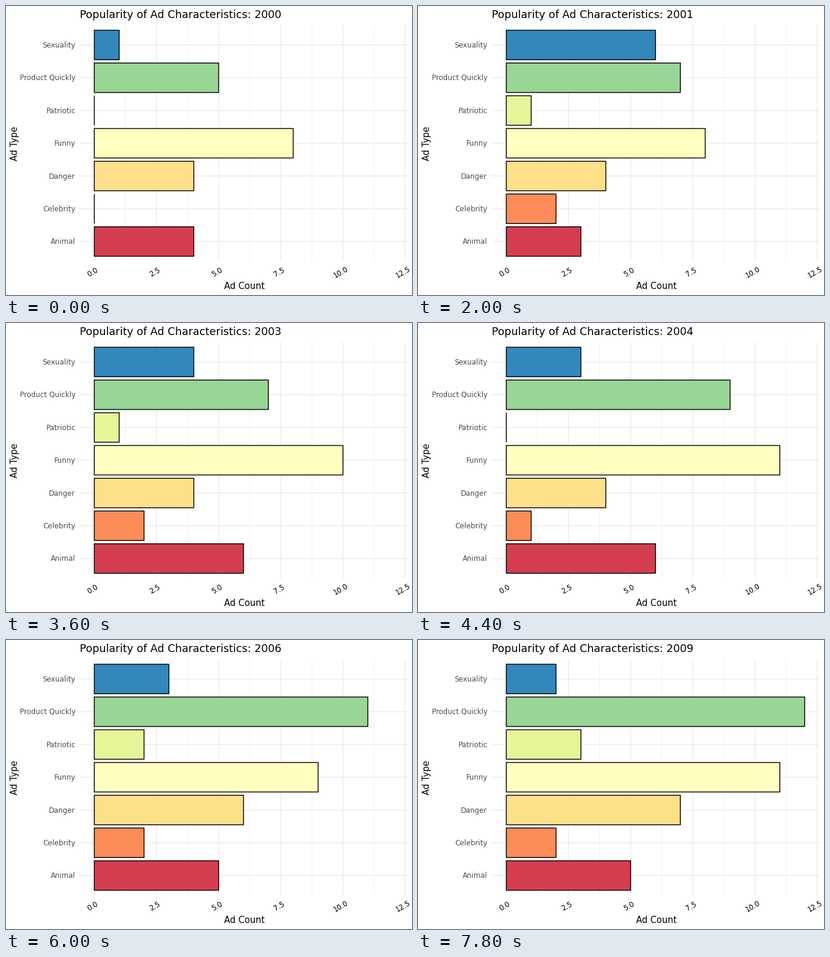
Recreate the animation shown at these times as a matplotlib script. Size 672x480 px, loop 8000 ms.

```python
import matplotlib.pyplot as plt
from matplotlib.animation import FuncAnimation
from matplotlib.patches import Rectangle

plt.rcParams["font.family"] = "DejaVu Sans"

WIDTH, HEIGHT, DPI = 672, 480, 96
INTERVAL, FRAMES = 200, 40
LEFT, RIGHT, TOP, BOTTOM = 121.5, 664.7, 32.1, 423.8
X_UNIT = (RIGHT - LEFT) / 13.2
Y_UNIT = (BOTTOM - TOP) / 7.2
LINE = 1.067
GRID = "#ebebeb"

CATEGORIES = ["Animal", "Celebrity", "Danger", "Funny",
              "Patriotic", "Product Quickly", "Sexuality"]
COLORS = ["#d53e4f", "#fc8d59", "#fee08b", "#ffffbf",
          "#e6f598", "#99d594", "#3288bd"]

# One row of counts per year from 2000, in category order.
COUNTS = [
    [4, 0, 4, 8, 0, 5, 1],
    [3, 6, 4, 10, 1, 4, 6],
    [3, 2, 4, 8, 1, 7, 6],
    [3, 2, 5, 11, 0, 8, 4],
    [6, 2, 4, 10, 1, 7, 4],
    [6, 1, 4, 11, 0, 9, 3],
    [2, 2, 3, 7, 0, 5, 2],
    [5, 2, 6, 9, 2, 11, 3],
    [6, 2, 4, 11, 3, 11, 3],
    [5, 2, 7, 11, 3, 12, 2],
]
# The bars jump on these frames; the title follows one frame later.
JUMPS = [5, 10, 14, 18, 22, 26, 30, 34, 38]


def x_pos(value):
    return LEFT + (value + 0.6) * X_UNIT


def y_pos(row):
    return BOTTOM - (row + 0.6) * Y_UNIT


def step_at(frame):
    return sum(frame >= jump for jump in JUMPS)


fig = plt.figure(figsize=(WIDTH / DPI, HEIGHT / DPI), dpi=DPI, facecolor="white")
ax = fig.add_axes([0, 0, 1, 1])
ax.set_xlim(0, WIDTH)
ax.set_ylim(HEIGHT, 0)
ax.axis("off")


def grid_line(xs, ys, width):
    ax.plot(xs, ys, color=GRID, lw=width, solid_capstyle="butt", snap=False, zorder=1)


def label(x, y, text, size, color="black", **style):
    return ax.text(x, y, text, fontsize=size, color=color, va="baseline",
                   rotation_mode="anchor", **style)


for k in range(5):
    grid_line([x_pos(1.25 + 2.5 * k)] * 2, [TOP, BOTTOM], LINE / 2)
for row, name in enumerate(CATEGORIES):
    grid_line([LEFT, RIGHT], [y_pos(row)] * 2, LINE)
    label(115, y_pos(row) + 4.3, name, 8.8, "#4d4d4d", ha="right")
for k in range(6):
    tick = 2.5 * k
    grid_line([x_pos(tick)] * 2, [TOP, BOTTOM], LINE)
    shift = 2 if tick >= 10 else 1
    label(x_pos(tick) - shift, 445.2, f"{tick:.1f}", 8.8, ha="center", rotation=30)

label(395, 470, "Ad Count", 11, ha="center")
label(18.5, 228, "Ad Type", 11, ha="center", rotation=90)
title = label(LEFT, 20, "", 13.2, ha="left")

bars = []
for row, color in enumerate(COLORS):
    bar = Rectangle((x_pos(0), y_pos(row) - 0.45 * Y_UNIT), 0, 0.9 * Y_UNIT,
                    facecolor=color, edgecolor="black", lw=LINE,
                    snap=False, zorder=2)
    bars.append(ax.add_patch(bar))


def update(frame):
    for bar, count in zip(bars, COUNTS[step_at(frame)]):
        bar.set_width(count * X_UNIT)
    title.set_text(f"Popularity of Ad Characteristics: {2000 + step_at(frame - 1)}")
    return [*bars, title]


anim = FuncAnimation(fig, update, frames=FRAMES, interval=INTERVAL,
                     repeat=True, repeat_delay=0)
plt.show()
```
